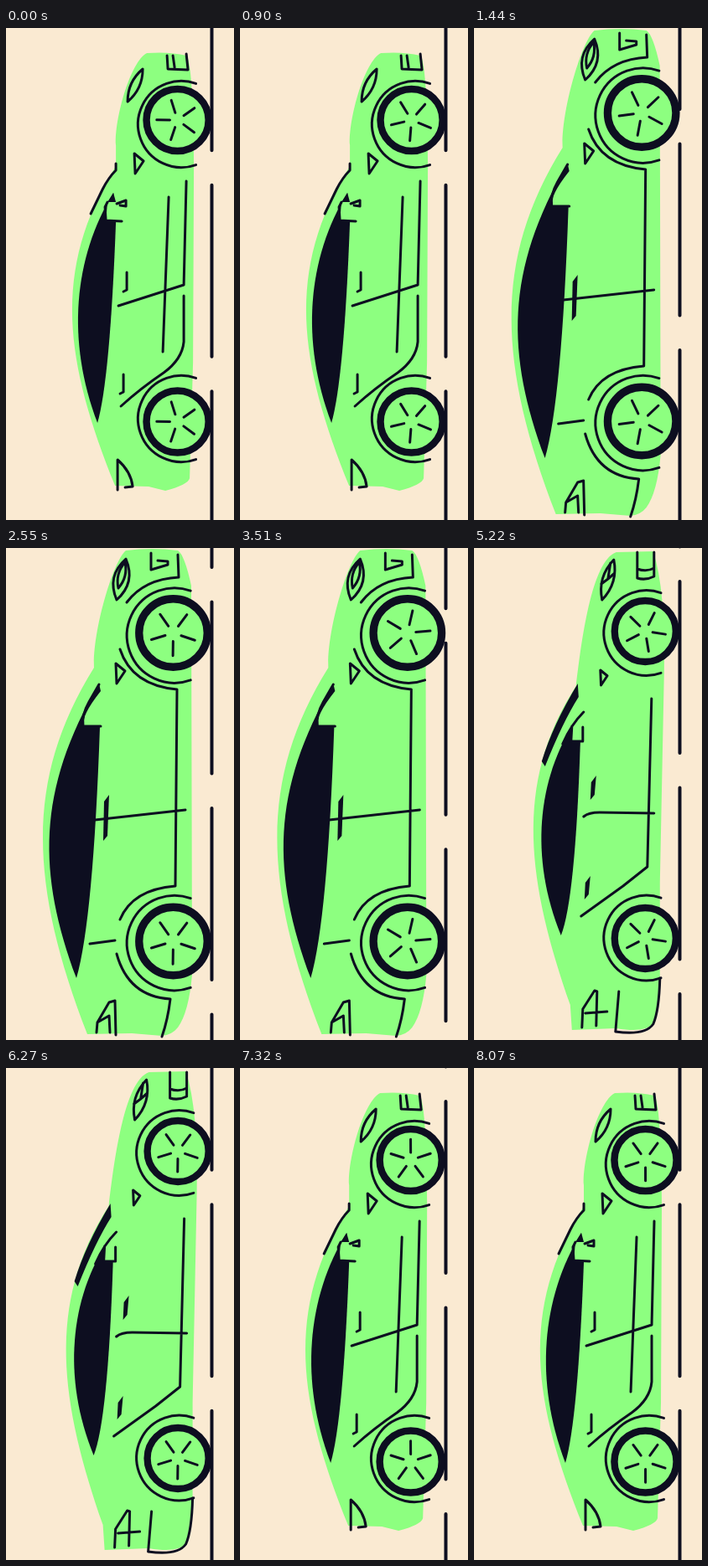
Recreate the animation shown at these times as an HTML page with a canvas. Size 272 by 588 pixels, loop 8.1 s.

```html
<!DOCTYPE html>
<html lang="en">
<head>
<meta charset="utf-8">
<title>Driving cars</title>
<style>
html, body { margin: 0; width: 100%; height: 100%; overflow: hidden; background: #faead2; }
canvas { display: block; width: 272px; height: 588px; }
</style>
</head>
<body>
<canvas id="stage"></canvas>
<script>
const W = 272, H = 588, LOOP = 8100, TURN = 2700, SWAP = 1020;
const CREAM = '#faead2', GREEN = '#8dff80', INK = '#0d0e20';
const GROUND = 245.5, DASH = 209, PERIOD = 246.5, ROLL = 300;

const canvas = document.getElementById('stage');
const ctx = canvas.getContext('2d');
const dpr = window.devicePixelRatio || 1;
canvas.width = W * dpr;
canvas.height = H * dpr;

const path = (...parts) => new Path2D(parts.join(' '));

// Small parts the cars share.
const gem = (x, y, k) => `M${x} ${y} l${11 * k} ${9 * k} l${-10 * k} ${15 * k} Z`;
const hook = (x, y) => `M${x} ${y} l0 21 l-4 2`;
const slash = (x, y, h) => `M${x} ${y} l-6 8 l-1 ${h - 8} l5 -6 Z`;
function leaf(x0, y0, x1, y1, w) {
  const dx = x1 - x0, dy = y1 - y0, k = w / Math.hypot(dx, dy);
  const mx = (x0 + x1) / 2, my = (y0 + y1) / 2;
  return `M${x0} ${y0} Q${mx + dy * k} ${my - dx * k} ${x1} ${y1}` +
    `Q${mx - dy * k} ${my + dx * k} ${x0} ${y0} Z`;
}

const hatch = {
  dx: -0.4,
  wheels: { x: 204.5, y: [110, 470.5], archY: [115, 467], archX: 4.5, r: 41.3 },
  spin: { from: 0, angle: 36, rate: 0.6243 },
  body: path('M130 547 C71 400 53 290 131 165 L131 140 C129 110 148 40 168 30',
    'Q195 28 215 33 Q223 40 224 165 L223 400 L219 538 Q217 546 190 553 L170 548 Z'),
  glass: path('M128 197 C80 275 72 375 109 472 Q124 420 131 232 Z'),
  cut: path('M121 207 L133 208 L139 231 L119 231 Z'),
  solid: path('M128 197 L121 208 L131 208 Z'),
  lines: path(
    'M101 222 L115 193 Q122 179 131 170 L131 162',
    'M121 208 L118 214 L119 230 L138 231 M132 210 L143 206 L143 213 L136 212',
    leaf(163, 49, 145, 88, 10), gem(153, 150, 1),
    'M192 33 L193 49 L217 50 L215 31 M199 33 L201 47',
    'M215 183 L212 307 L134 332 M194 202 L187 387',
    'M212 320 L212 375 Q210 396 188 412 Q160 431 137 452',
    hook(144, 292), hook(140, 414),
    'M133 552 L133 516 Q149 530 151 548 L142 549')
};

const coupe = {
  dx: 0.5,
  wheels: { x: 199.5, y: [101.5, 470], archY: [104.5, 472], archX: 1.5, r: 45.4 },
  spin: { from: 1440, angle: 28, rate: 0.575 },
  body: path('M97 581 C27 400 23 275 105 143 C103 100 128 15 143 3',
    'Q175 -1 205 3 Q213 8 221 45 L222 510 Q218 555 205 573 Q198 582 186 583 L150 580 Z'),
  glass: path('M111 162 C36 290 38 390 84 514 Q104 445 112 214 L92 213 Q90 200 113 171 Z'),
  solid: path(slash(123, 295, 55)),
  lines: path(
    'M111 163 L99 184 Q90 200 92 213 L113 213',
    leaf(143, 13, 132, 62, 18), leaf(142, 17, 134, 48, 8), gem(131, 138, 1),
    'M173 6 L173 26 L193 20 L193 16 L181 15',
    'M205 8 L206 35 Q165 37 144 65',
    'M136 121 Q150 164 204 169 L202 404 Q151 408 136 444',
    'M132 485 Q146 536 196 539 Q193 564 186 584',
    'M106 325 L214 313 M100 473 L130 469',
    'M108 579 L109 567 L123 543 L130 541 L131 582 M109 567 L123 559 L124 579')
};

const sedan = {
  dx: 0.2,
  wheels: { x: 204.5, y: [99.5, 466.5], archY: [101.5, 466], archX: 1.5, r: 40.7 },
  spin: { from: 4260, angle: 54, rate: 0.627 },
  body: path('M117 576 L115 546 C65 402 46 282 122 165 C128 115 140 15 170 5',
    'L214 4 Q229 50 227 150 L222 400 L222 520 Q221 550 214 568 Q205 580 170 574 Z'),
  glass: path('M121 207 C76 275 66 370 104 463 Q121 420 127 234 L127 207 Z'),
  cut: path('M132 199 L116 213 L116 231 L131 231 Z'),
  solid: path('M124 162 L125 178 Q106 208 85 261 L81 255 Q94 212 124 162 Z',
    slash(146, 272, 29), slash(139, 392, 28)),
  lines: path(
    'M131 196 Q116 211 106 234 M117 213 L116 231 L130 231 L130 214',
    leaf(167, 14, 153, 62, 13), gem(151, 146, 0.75),
    'M163 18 L160 37 L168 30 M160 37 L152 43',
    'M195 5 L195 36 Q205 39 215 34 L215 5 M195 25 Q206 29 215 24',
    'M212 180 L207 381 L178 404 L128 440',
    'M131 321 Q137 316 150 316 L215 317',
    'M173 530 L169 578 Q204 583 214 569 Q221 553 222 514',
    'M129 573 L130 551 L144 529 L147 530 L146 571 M133 556 L159 554')
};

const cars = [hatch, coupe, sedan];
const mod = (a, n) => ((a % n) + n) % n;
const ease = k => k * k * (3 - 2 * k);

// Height of the car: squash, pop past full size, settle.
function stretch(u) {
  if (u < 150) return 0.92 + 0.12 * ease(u / 150);
  if (u < 420) return 1.04 - 0.04 * ease((u - 150) / 270);
  if (u > TURN - 120) return 1 - 0.08 * ease((u - TURN + 120) / 120);
  return 1;
}

function fill(shape, color) {
  if (!shape) return;
  ctx.fillStyle = color;
  ctx.fill(shape);
}

function stroke(shape, width) {
  ctx.lineWidth = width;
  ctx.stroke(shape);
}

function drawRoad(t) {
  const road = new Path2D();
  const first = mod(185 + t / ROLL * PERIOD, PERIOD) - PERIOD;
  for (let y = first; y < H; y += PERIOD) {
    road.moveTo(GROUND, y + 2);
    road.lineTo(GROUND, y + DASH - 2);
  }
  stroke(road, 4);
}

function drawWheel({ x, y, archX, archY, r }, i, angle) {
  const arch = new Path2D(), rim = new Path2D(), spokes = new Path2D();
  const ring = r * 0.205, open = Math.PI * 0.39;
  arch.arc(x + archX, archY[i], r * 1.25, open, -open);
  stroke(arch, 3);
  rim.arc(x, y[i], r - ring / 2, 0, Math.PI * 2);
  fill(rim, GREEN);
  stroke(rim, ring);
  for (let n = 0; n < 5; n++) {
    const a = (angle + n * 72) * Math.PI / 180, c = Math.cos(a) * r, s = Math.sin(a) * r;
    spokes.moveTo(x + c * 0.22, y[i] + s * 0.22);
    spokes.lineTo(x + c * 0.6, y[i] + s * 0.6);
  }
  stroke(spokes, 3);
}

function drawCar(car, t, scale) {
  const bob = 0.5 * Math.cos(t / ROLL * Math.PI * 2);
  const { from, angle, rate } = car.spin;
  ctx.save();
  ctx.translate(GROUND + car.dx + bob, 0);
  ctx.scale(scale, 1);
  ctx.translate(-GROUND, 0);
  fill(car.body, GREEN);
  fill(car.glass, INK);
  fill(car.cut, GREEN);
  fill(car.solid, INK);
  stroke(car.lines, 3);
  for (const i of [0, 1]) drawWheel(car.wheels, i, angle + (t - from) * rate);
  ctx.restore();
}

function draw(now) {
  const t = now % LOOP;
  const since = mod(t - SWAP, LOOP);
  const index = (Math.floor(since / TURN) + 1) % 3;
  // The first car runs across the loop point.
  const time = index === 0 && t > SWAP ? t - LOOP : t;
  ctx.setTransform(dpr, 0, 0, dpr, 0, 0);
  ctx.fillStyle = CREAM;
  ctx.fillRect(0, 0, W, H);
  ctx.strokeStyle = INK;
  ctx.lineCap = ctx.lineJoin = 'round';
  drawRoad(t);
  drawCar(cars[index], time, stretch(since % TURN));
}

const start = performance.now();
function tick() {
  draw(performance.now() - start);
  requestAnimationFrame(tick);
}
tick();
</script>
</body>
</html>
```
